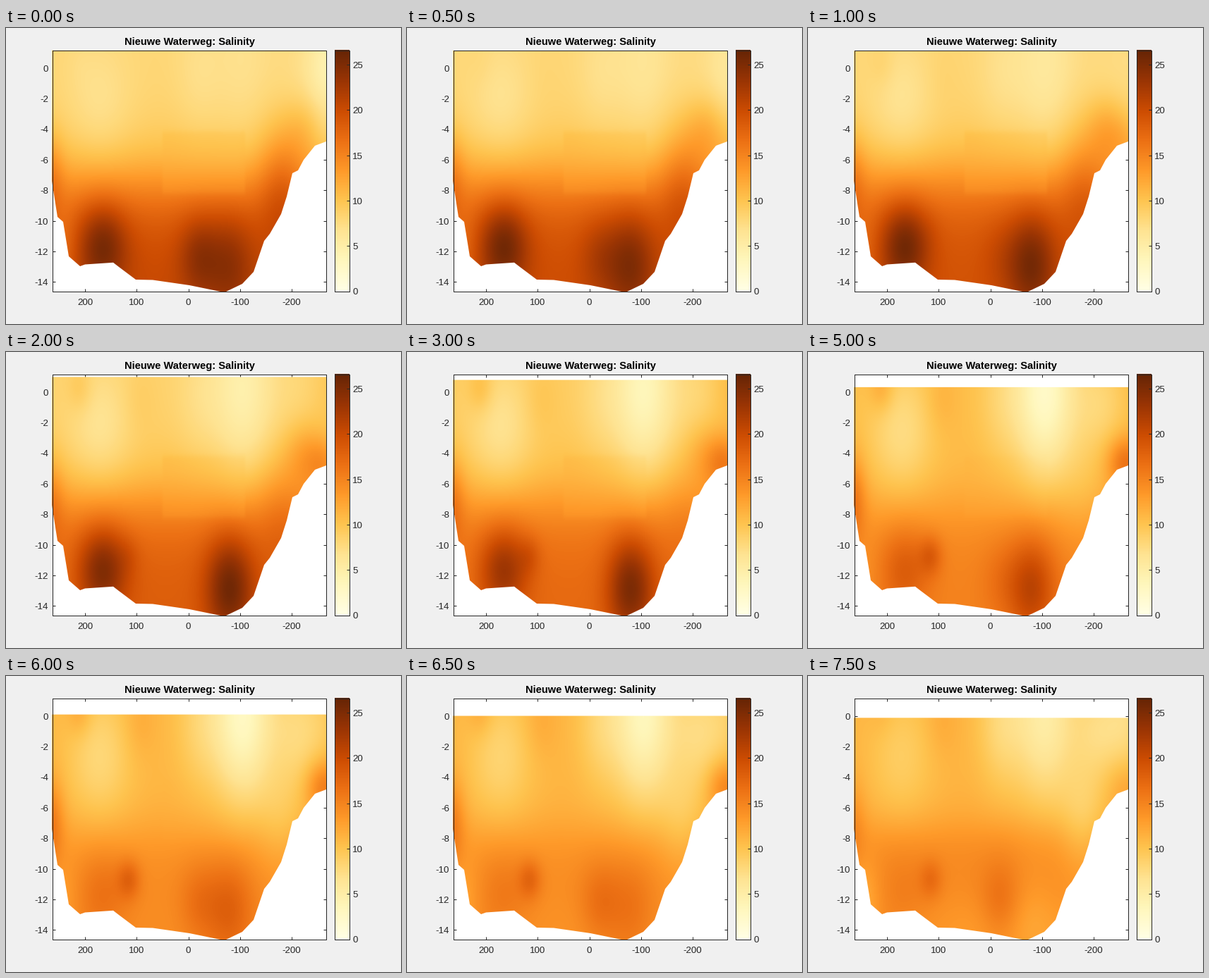
A matplotlib script that plays this animation: 560 px wide and 420 px high, repeating every 8000 ms.

```python
import numpy as np
import matplotlib.pyplot as plt
from matplotlib.animation import FuncAnimation
from matplotlib.path import Path

W, H, DPI = 560, 420, 100
FRAMES, STEP = 16, 500
PX = 72 / DPI
INK = "#262626"
VMAX = 26.6

plt.rcParams["font.family"] = "Liberation Sans"

# plot box and colour bar edges, in pixels
LEFT, RIGHT, TOP, BOTTOM = 65.5, 453.5, 31.5, 373.5
BAR_L, BAR_R = 465.5, 486.5


def to_x(u):
    return 258.5 - 0.7325 * u


def to_y(z):
    return 56.5 - 21.71 * z


def bar_y(v):
    return BOTTOM - (BOTTOM - TOP) * v / VMAX


# river bed, left bank to right bank, in pixels
BED = [(65, 217), (73, 268), (81, 275), (89, 324), (105, 338), (112, 335.5),
       (152, 332.8), (160, 339), (184, 357), (208, 357.5), (260, 365),
       (304, 374), (312, 374), (335, 363), (351, 346), (366, 302),
       (374, 292), (390, 264), (398, 239), (406, 206), (414, 202),
       (422, 187), (438, 167), (454, 161)]

# every salinity term has one value per key time (seconds)
KEYS = np.array([0, 2, 5, 7.5])

# halocline: surface value, bottom value, depth, thickness
LAYERS = [(8, 20.3, -7.6, 1.6), (8.5, 18.3, -7.1, 1.5),
          (10.5, 15.1, -7.6, 1.3), (11.2, 14.7, -7.3, 0.9)]

# (u, z, width, height), amplitude at each key
PLUMES = [
    ((172, -2.7, 44, 3), (-1.5, -2.3, -3.2, -2.2)),
    ((210, 0.2, 17, 1.1), (-0.2, 1.5, 2.2, 0.6)),
    ((95, -0.5, 22, 1.6), (0, 0.6, 1, 0.8)),
    ((-105, 0, 42, 4), (-1.2, -4, -8, -6)),
    ((-20, -0.5, 32, 3), (-1, -1.2, -1.8, -3)),
    ((-215, -1, 38, 2.5), (-0.8, -0.8, -2.5, -3.6)),
    ((-270, 0, 28, 2.5), (-3.5, 1, 0.5, -2.5)),
]
BANKS = [
    ((268, -6.8, 18, 1.9), (3, 2.8, 4.5, 2.2)),
    ((-180, -7.2, 32, 2.7), (3.8, 1.6, -1, -2.8)),
    ((-262, -4.6, 24, 1.2), (-0.5, 3, 5.5, 1.5)),
    ((-225, -4, 28, 1.6), (1.8, 3, 0.5, 0.3)),
]
CORES = [
    ((165, -11.6, 33, 2), (6, 7, 3.5, 1)),
    ((245, -12, 22, 2), (-2.5, -1, -1, -2.5)),
    ((115, -10.7, 16, 0.9), (0, 0.8, 3, 2.4)),
    ((-80, -12.8, 33, 2.4), (4, 7.8, 6, -0.8)),
    ((-20, -12.3, 28, 1.9), (3.8, 0, 1.3, 2.6)),
    ((-40, -14.2, 140, 1.9), (0, 0, 0, -1.8)),
]
BLOBS = PLUMES + BANKS + CORES
SLAB = np.array([1, 1, 0.3, 0])

X0, X1, Y0, Y1 = 65, 454, 31, 374
U = (258.5 - (np.arange(X0, X1) + 0.5)) / 0.7325
Z = (56.5 - (np.arange(Y0, Y1) + 0.5)) / 21.71


def bell(a, mid, width):
    return np.exp(-0.5 * ((a - mid) / width) ** 2)


def band(a, lo, hi, soft):
    return 0.5 * (np.tanh((a - lo) / soft) - np.tanh((a - hi) / soft))


def layer(top, deep, mid, thick):
    return top + (deep - top) / (1 + np.exp((Z - mid) / thick))


BASE = np.array([layer(*p) for p in LAYERS])
BELL_U = np.array([bell(U, b[0], b[2]) for b, _ in BLOBS])
BELL_Z = np.array([bell(Z, b[1], b[3]) for b, _ in BLOBS])
AMPS = np.array([a for _, a in BLOBS])
SLAB_FIELD = np.outer(band(Z, -8.2, -4.2, 0.2) * (0.7 + 0.4 * (Z + 4.2)),
                      band(U, -110, 50, 2.5))


def key_weights(t):
    """Cubic Lagrange weights of the four key times."""
    w = []
    for k in KEYS:
        rest = KEYS[KEYS != k]
        w.append(np.prod((t - rest) / (k - rest)))
    return np.array(w)


def salinity(t):
    w = key_weights(t)
    field = (BELL_Z * (AMPS @ w)[:, None]).T @ BELL_U
    return field + (w @ BASE)[:, None] + (w @ SLAB) * SLAB_FIELD


def water_path(t):
    level = 46 - 14.3 * np.cos(np.pi * t / 8.5)
    return Path([(X0, level)] + BED + [(X1, level), (X0, level)])


fig = plt.figure(figsize=(W / DPI, H / DPI), dpi=DPI, facecolor="#f0f0f0")
ax = fig.add_axes([0, 0, 1, 1])
ax.axis("off")


def line(xs, ys, z):
    ax.plot(xs, ys, color=INK, lw=PX, zorder=z, solid_capstyle="butt")


def frame_box(x0, x1, z):
    line([x0, x1, x1, x0, x0], [TOP, TOP, BOTTOM, BOTTOM, TOP], z)


def label(x, y, s, ha):
    ax.text(x, y, s, ha=ha, va="baseline", fontsize=13.33 * PX, color=INK)


ax.fill([LEFT, RIGHT, RIGHT, LEFT], [TOP, TOP, BOTTOM, BOTTOM],
        color="white", lw=0, zorder=0)

for u in range(200, -201, -100):
    x = to_x(u)
    line([x, x], [BOTTOM, BOTTOM - 4], 1)
    line([x, x], [TOP, TOP + 4], 1)
    label(x, 393, str(u), "center")
for z in range(0, -15, -2):
    y = to_y(z)
    line([LEFT, LEFT + 4], [y, y], 1)
    line([RIGHT, RIGHT - 4], [y, y], 1)
    label(60, y + 5, str(z), "right")

water = ax.imshow(salinity(0), cmap="YlOrBr", vmin=0, vmax=VMAX, zorder=2,
                  extent=(X0, X1, Y1, Y0), interpolation="nearest",
                  aspect="auto")
ax.imshow(np.linspace(1, 0, 343)[:, None], cmap="YlOrBr", vmin=0, vmax=1,
          extent=(BAR_L, BAR_R, BOTTOM, TOP), interpolation="nearest",
          aspect="auto", zorder=2)
frame_box(LEFT, RIGHT, 3)
frame_box(BAR_L, BAR_R, 3)
for v in range(0, 26, 5):
    y = bar_y(v)
    line([BAR_R - 4, BAR_R], [y, y], 3)
    label(491, y + 5, str(v), "left")

ax.text(260, 24, "Nieuwe Waterweg: Salinity", ha="center", va="baseline",
        fontsize=14.67 * PX, weight="bold", color="black")
ax.set_xlim(0, W)
ax.set_ylim(H, 0)


def update(i):
    t = i * STEP / 1000
    water.set_data(salinity(t))
    water.set_clip_path(water_path(t), ax.transData)
    return [water]


anim = FuncAnimation(fig, update, frames=FRAMES, interval=STEP,
                     repeat=True, repeat_delay=0, blit=False)
plt.show()
```
